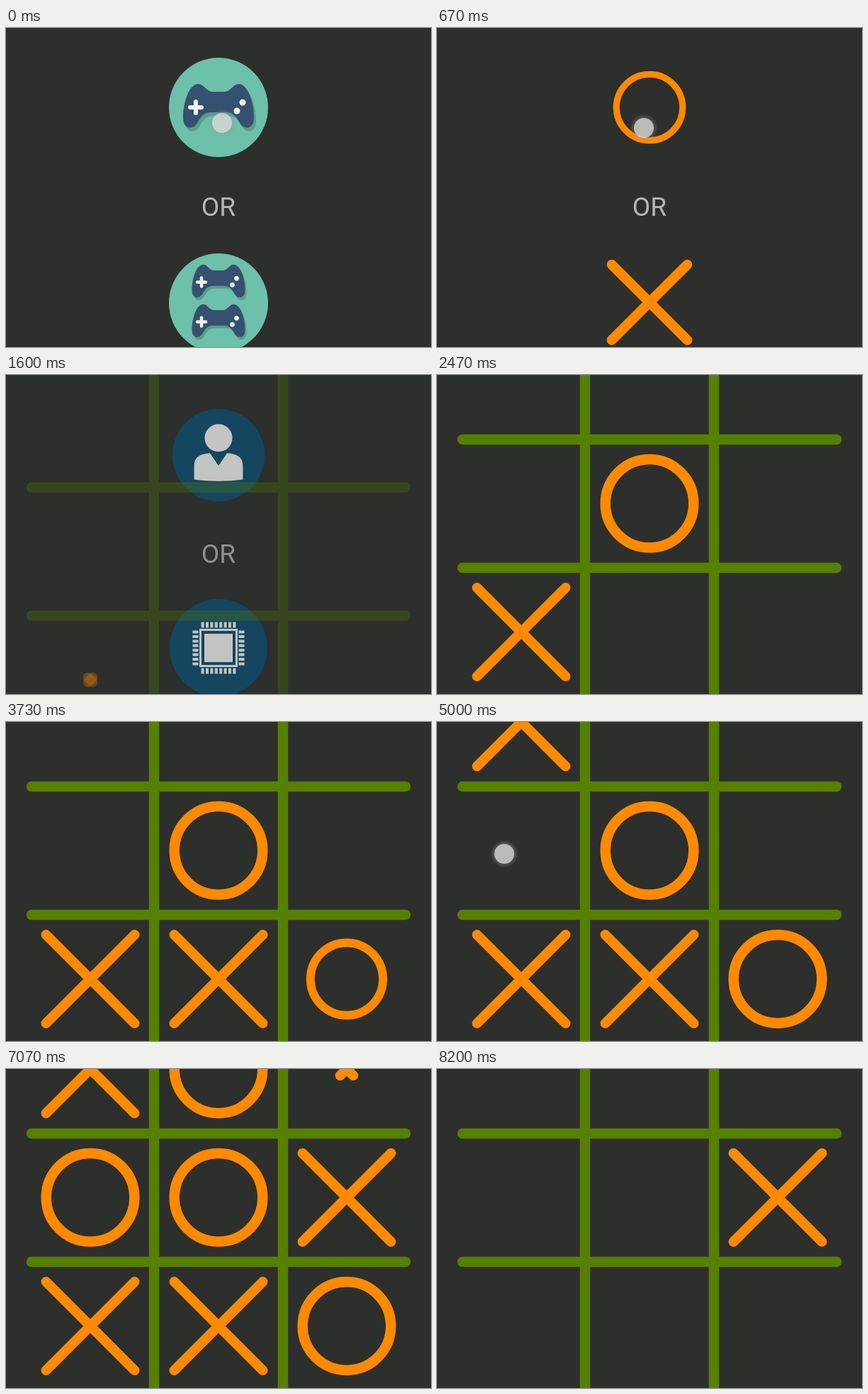
Write an HTML page with a canvas that moves like this. It is 600 px wide and 450 px high and loops after 8.34 s.

```html
<!DOCTYPE html>
<html>
<head>
<meta charset="utf-8">
<style>
  html, body { margin: 0; overflow: hidden; background: #2d2f2d; }
  canvas { display: block; }
</style>
</head>
<body>
<canvas id="stage" width="600" height="450"></canvas>
<script>
const ctx = document.getElementById('stage').getContext('2d');
const LOOP = 8340, BG = '#2d2f2d', ORANGE = '#ff8a00', GREEN = '#558000';
const NAVY = '#36506f', TEAL = '#6dc0a9', BLUE = '#0c4f73';

const PAD = new Path2D('M-30-31C-20-32-18-20-8-20H8C18-20 20-32 30-31C44-28 50 0 50 16' +
  'C50 34 36 34 30 24C25 14 20 10 12 9H-12C-20 10-25 14-30 24C-36 34-50 34-50 16C-50 0-44-28-30-31Z');
const TORSO = new Path2D('M-37 37V16C-37 3-28-2-13-3L0 16L13-3C28-2 37 3 37 16V37Q0 42-37 37Z');

// mark, column, row, start, end
const MOVES = [
  ['x', 0, 2, 1590, 2000], ['o', 1, 1, 2030, 2430], ['x', 1, 2, 2770, 3170],
  ['o', 2, 2, 3500, 3900], ['x', 0, 0, 4200, 4600], ['o', 0, 1, 5000, 5400],
  ['x', 2, 1, 5760, 6130], ['o', 1, 0, 6240, 6640], ['x', 2, 0, 7040, 7440]
];
const REMATCH = [['x', 2, 1, 7770, 8180]];
const CLEARED = 7770;

// x, y, shown from, until
const TAPS = [
  [305, 134, -200, 180], [292, 141, 500, 790], [302, 134, 1250, 1520],
  [303, 186, 1900, 2150], [480, 366, 3360, 3640], [95, 186, 4400, 5100],
  [302, 32, 6150, 6370], [300, 240, 7680, 7850]
];

const ramp = (t, a, b) => Math.min(1, Math.max(0, (t - a) / (b - a)));
const easeOut = u => 1 - (1 - u) ** 2;
const press = (t, a, b) => 1 - 0.07 * ramp(t, a, b);

function at(x, y, scale, draw) {
  ctx.save();
  ctx.translate(x, y);
  ctx.scale(scale, scale);
  draw();
  ctx.restore();
}

function disc(x, y, r, color) {
  ctx.fillStyle = color;
  ctx.beginPath();
  ctx.arc(x, y, r, 0, 7);
  ctx.fill();
}

function line(x1, y1, x2, y2, width, color) {
  ctx.lineWidth = width;
  ctx.strokeStyle = color;
  ctx.beginPath();
  ctx.moveTo(x1, y1);
  ctx.lineTo(x2, y2);
  ctx.stroke();
}

function cross(x, y, arm) {
  line(x - arm, y - arm, x + arm, y + arm, 14, ORANGE);
  line(x + arm, y - arm, x - arm, y + arm, 14, ORANGE);
}

function ring(x, y, r, width) {
  ctx.lineWidth = width;
  ctx.strokeStyle = ORANGE;
  ctx.beginPath();
  ctx.arc(x, y, r, 0, 7);
  ctx.stroke();
}

function veil(alpha) {
  ctx.globalAlpha = alpha;
  ctx.fillStyle = BG;
  ctx.fillRect(0, 0, 600, 450);
  ctx.globalAlpha = 1;
}

function gamepad() {
  ctx.fillStyle = '#559d8c';
  ctx.translate(3, 5);
  ctx.fill(PAD);
  ctx.translate(-3, -5);
  ctx.fillStyle = NAVY;
  ctx.fill(PAD);
  line(-40, 2, -24, 2, 6, '#f1f3ea');
  line(-32, -6, -32, 10, 6, '#f1f3ea');
  disc(34, -5, 4.5, '#f1f3ea');
  disc(26, 7, 4.5, '#f1f3ea');
}

function playersMenu(t) {
  at(300, 112, press(t, 70, 200), () => {
    disc(0, 0, 70, TEAL);
    at(0, -2, 1, gamepad);
  });
  disc(300, 388, 70, TEAL);
  at(300, 357, 0.75, gamepad);
  at(300, 413, 0.75, gamepad);
}

function markMenu(t) {
  const grow = ramp(t, 270, 740);
  if (!grow) return;
  ring(300, 112, 54.8 * grow, 10.6 * grow);
  cross(300, 387, 62.5 * grow);
}

function person() {
  disc(0, 0, 70, BLUE);
  disc(0, -26, 21, '#fff');
  ctx.fillStyle = '#fff';
  ctx.fill(TORSO);
}

function chip() {
  disc(0, 0, 69, BLUE);
  ctx.fillStyle = '#fff';
  ctx.fillRect(-20, -20, 40, 40);
  ctx.strokeStyle = '#fff';
  ctx.lineWidth = 3;
  ctx.strokeRect(-25.5, -25.5, 51, 51);
  ctx.lineCap = 'butt';
  ctx.setLineDash([4, 2.4]);
  for (const p of [-32.5, 32.5]) {
    line(-24.4, p, 24.4, p, 8, '#fff');
    line(p, -24.4, p, 24.4, 8, '#fff');
  }
}

function rivalMenu(t) {
  at(300, 113, press(t, 1450, 1580), person);
  at(300, 385, 1, chip);
}

function menus(t) {
  if (t < 470) {
    playersMenu(t);
    veil(ramp(t, 200, 450));
  }
  if (t < 950) {
    markMenu(t);
    veil(ramp(t, 750, 950));
  } else {
    rivalMenu(t);
    veil(1 - ramp(t, 950, 1200));
  }
  ctx.fillStyle = '#b5b7b5';
  ctx.font = '37px Roboto, sans-serif';
  ctx.textAlign = 'center';
  ctx.fillText('OR', 300, 265);
}

function board(t, shown) {
  ctx.globalAlpha = shown;
  ctx.translate(0, 94 * (1 - shown));
  ctx.beginPath();
  for (const x of [209, 391]) {
    ctx.moveTo(x, -83);
    ctx.lineTo(x, 460);
  }
  for (const y of [91, 272]) {
    ctx.moveTo(36, y);
    ctx.lineTo(564, y);
  }
  ctx.lineWidth = 14.5;
  ctx.strokeStyle = GREEN;
  ctx.stroke();
  for (const [mark, col, row, start, end] of t < CLEARED ? MOVES : REMATCH) {
    if (t < start) continue;
    const grow = easeOut(ramp(t, start, end));
    const x = 119 + 181 * col, y = 181.3 * row;
    if (mark === 'x') cross(x, y, 62.5 * grow);
    else ring(x, y, 62.3 * grow, 14.5 * grow);
  }
}

function touches(t) {
  for (const [x, y, from, until] of TAPS) {
    ctx.globalAlpha = Math.min(ramp(t, from, from + 100), 1 - ramp(t, until - 80, until));
    if (!ctx.globalAlpha) continue;
    const halo = ctx.createRadialGradient(x, y, 13, x, y, 20);
    halo.addColorStop(0, 'rgba(150,150,150,.4)');
    halo.addColorStop(1, 'rgba(150,150,150,0)');
    disc(x, y, 20, halo);
    disc(x, y, 14, 'rgba(225,225,225,.72)');
  }
}

function frame(now) {
  const t = now % LOOP;
  const shown = easeOut(ramp(t, 1540, 1940));
  ctx.globalAlpha = 1;
  ctx.lineCap = 'round';
  veil(1);
  if (shown < 1) menus(t);
  veil(shown);
  if (shown) at(0, 0, 1, () => board(t, shown));
  touches(t);
  requestAnimationFrame(frame);
}

const begin = performance.now();
requestAnimationFrame(() => (function tick() {
  frame(performance.now());
})());
</script>
</body>
</html>
```
